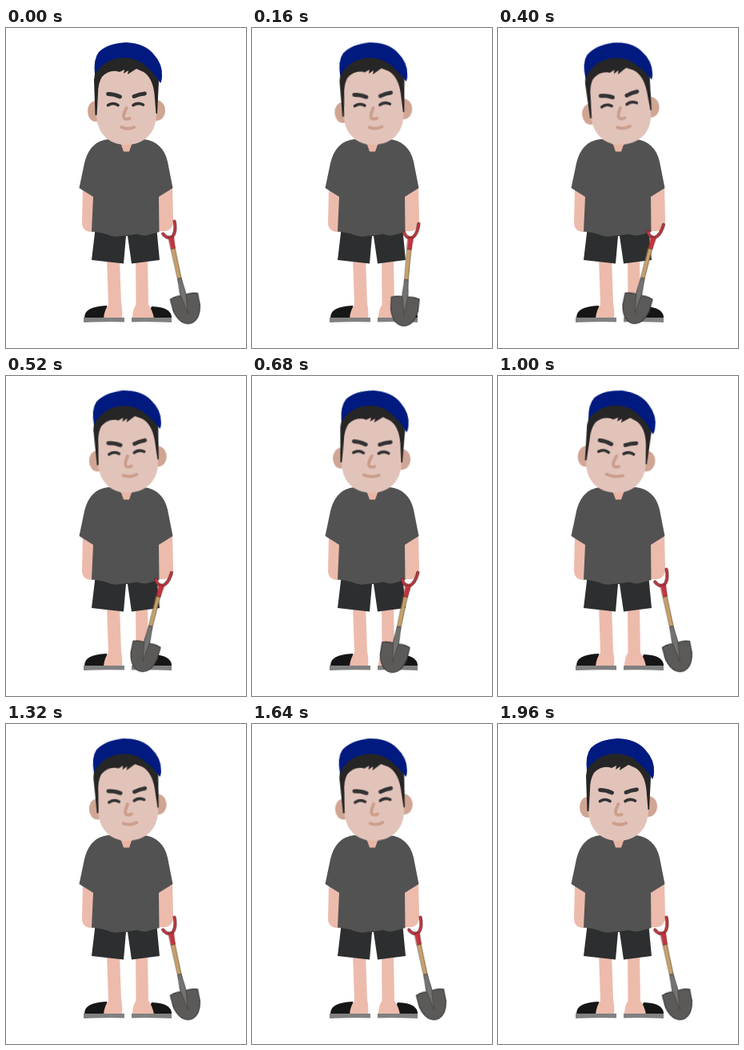
Write an HTML page that moves like this. It is 300x400 px and loops after 2 s.

```html
<!DOCTYPE html>
<html lang="en">
<head>
<meta charset="utf-8">
<title>Man with a shovel</title>
<style>
  html, body { margin: 0; width: 100%; height: 100%; overflow: hidden; background: #fff; }
  svg { display: block; width: 300px; height: 400px; }
  .line { fill: none; stroke-linecap: round; stroke-linejoin: round; }
  .skin { fill: #edbbac; }
  .ear { fill: #d0a594; }
  .head { transform-origin: 150px 77px; animation: tilt 2s ease-in-out infinite; }
  .mouth { transform-origin: 160px 124px; animation: smile 2s ease-in-out infinite; }
  .shovel { transform-origin: 199.5px 236px; animation: swing 2s ease-in-out infinite; }

  @keyframes tilt {
    0%, 92.5%, 100% { transform: rotate(0deg); }
    17.5% { transform: rotate(-6.3deg); }
    45% { transform: rotate(6deg); }
    75% { transform: rotate(-6deg); }
  }
  @keyframes smile {
    0%, 17.5%, 75%, 100% { transform: scaleX(1); }
    45% { transform: scaleX(1.28); }
  }
  @keyframes swing {
    0%, 46%, 100% { transform: rotate(-13deg); }
    13.5%, 31% { transform: rotate(13.3deg); }
  }
</style>
</head>
<body>
<svg viewBox="0 0 300 400">
  <!-- sandals and legs -->
  <path d="M98 363Q97 348 126 347L130 363ZM207 363Q208 349 182 348L176 363Z" fill="#161616"/>
  <g class="skin">
    <path d="M126 286L128 346Q123 352 122 363H145Q146 353 144 345L142 286Z"/>
    <path d="M162 286L162.500 346Q158 352 158 363H185Q183 352 178 346L177 286Z"/>
  </g>
  <path d="M97 362H148V367.500Q122 367 97 368ZM157 362H207V368Q182 367 157 367.500Z" fill="#808080"/>

  <!-- arms, shorts, shirt -->
  <g class="skin">
    <path d="M96 200L95 243Q95 255 108 255L111 205Z"/>
    <path d="M186 205L189 254H195Q209 255 209 240L208 198Z"/>
  </g>
  <path d="M112 248L107 290L147 294.500L150 260L152 260L157 294.500L192 290L188 248Z" fill="#2c2e2f"/>
  <path d="M128 139C112 141 103 150 98 169L91.500 200L109 211L107 254.500Q118 255 126 258Q135 262 143 260Q155 259 164 257.500Q174 261 180 258L191.500 255L191 211L208.500 200L202 167C198 150 188 141 172 139Z" fill="#525252"/>
  <path d="M140 142L144 146L147 154.500H154L157 146L160 142Z" fill="#e9b5a5"/>

  <g class="shovel">
    <g transform="translate(199.500 236)" class="line">
      <path id="grip" d="M-8 20Q-5 27 1.500 26.500Q9 23 9.500 8" stroke="#5c2024" stroke-width="3.900"/>
      <path d="M-8 20Q-5 27 1.500 26.500Q9 23 9.500 8" stroke="#cb3a42" stroke-width="2.200"/>
      <path d="M-2 26L4 26L2.800 41L-2.200 41Z" fill="#c5343c" stroke="#7a1e28" stroke-width=".8"/>
      <path d="M-2.200 41H2.600L1.800 79H-2.400Z" fill="#c9a06a" stroke="#6b5636" stroke-width=".8"/>
      <path d="M-17.500 102Q-10 99 0 101Q10 99 17.500 102L17 117Q13 136 0 137Q-13 136 -17 117Z" fill="#5b5a59" stroke="#353535" stroke-width="1.200"/>
      <path d="M-2.400 79H1.800L3 99L0 124L-4 99Z" fill="#747372" stroke="#454545" stroke-width=".9"/>
    </g>
  </g>

  <g class="head">
    <ellipse class="ear" cx="112" cy="104" rx="10" ry="13"/>
    <ellipse class="ear" cx="188" cy="103" rx="11" ry="13"/>
    <path d="M113 66V107C113 131 128 146 150 146C173 146 188 131 188 107V66Q180 50 150 48Q120 50 113 66Z" fill="#e2c3ba"/>
    <path d="M111.500 109L110 65Q112 32 150 30Q188 34 191 67L189 107H187.500L185.500 82Q183 62 172 55L163 51L152 58L153 53L147 57L148 52L142 55Q130 51 120 61Q115 69 115 82L113.500 109Z" fill="#262626"/>
    <path d="M111 58Q109 39 116 30Q127 19 150 18Q173 19 184 32Q196 45 195 60Q195 66 193 69Q184 54 169 43Q156 35 138 38Q121 42 111 58Z" fill="#001a80"/>
    <g class="line" stroke="#323232">
      <path d="M127.500 82.500Q135 82.500 142.500 86M160 85.500Q167 82.500 173.500 82" stroke-width="4.800"/>
      <path d="M127.500 96.500Q134 92.500 140 96.500M159 96.500Q165 92.500 171.500 96" stroke-width="3.600"/>
    </g>
    <g class="line" stroke="#cb9e8c" stroke-width="4">
      <path d="M150.500 100Q145 111 148 113Q151 114.500 154.500 113"/>
      <path class="mouth" d="M144.500 124Q152 127.500 160 124"/>
    </g>
  </g>
</svg>
</body>
</html>
```
